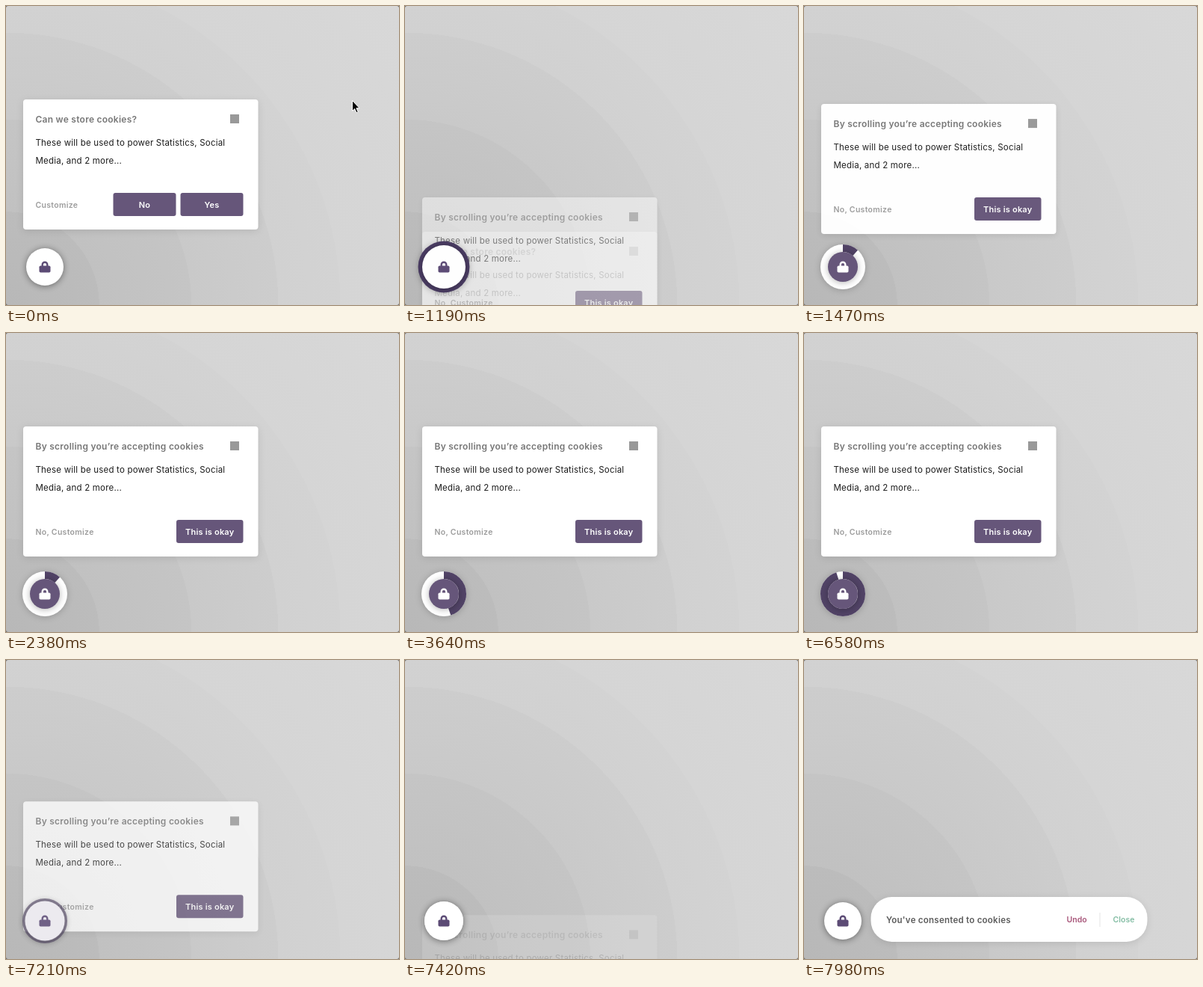
Animation, 526 px wide and 400 px high, one loop 8 s. Source, as an HTML page:

```html
<!DOCTYPE html>
<html lang="en">
<head>
<meta charset="utf-8">
<title>Cookie consent</title>
<style>
html, body { margin: 0; width: 100%; height: 100%; overflow: hidden; background: #666; }
svg { display: block; width: 526px; height: 400px; border-radius: 3px; font-family: Inter, "Open Sans", sans-serif; }
.card { filter: drop-shadow(0 2px 5px rgba(0,0,0,.1)); }
.panel { fill: #fff; }
.title { font-size: 12px; font-weight: 600; letter-spacing: .25px; fill: #777; }
.body { font-size: 11.5px; letter-spacing: .2px; fill: #1c1c1c; }
.link { font-size: 10.5px; font-weight: 600; letter-spacing: .3px; fill: #9c9c9c; }
.btn { fill: #66567a; }
.label { font-size: 11px; font-weight: 600; letter-spacing: .2px; fill: #fff; text-anchor: middle; }
.small { font-size: 10.5px; font-weight: 600; }
.mark { fill: #999; }
#disc { filter: drop-shadow(0 1px 4px rgba(0,0,0,.2)); }
#core { filter: drop-shadow(0 1px 4px rgba(0,0,0,.3)); }
</style>
</head>
<body>
<svg viewBox="0 0 526 400">
  <defs>
    <radialGradient id="glow" gradientUnits="userSpaceOnUse" cx="0" cy="400" r="660">
      <stop offset="0" stop-color="#b8b8b8"/>
      <stop offset=".189" stop-color="#bcbcbc"/>
      <stop offset=".189" stop-color="#c1c1c1"/>
      <stop offset=".376" stop-color="#c5c5c5"/>
      <stop offset=".376" stop-color="#c9c9c9"/>
      <stop offset=".552" stop-color="#cdcdcd"/>
      <stop offset=".552" stop-color="#d1d1d1"/>
      <stop offset=".678" stop-color="#d3d3d3"/>
      <stop offset=".678" stop-color="#d5d5d5"/>
      <stop offset="1" stop-color="#d8d8d8"/>
    </radialGradient>
    <g id="sheet">
      <rect class="panel" x="23" y="125" width="314.5" height="174" rx="4"/>
      <rect class="mark" x="300" y="145" width="12" height="12"/>
      <text class="body" x="39.5" y="186.5">These will be used to power Statistics, Social</text>
      <text class="body" x="39.5" y="210.5">Media, and 2 more...</text>
    </g>
  </defs>

  <rect width="526" height="400" fill="url(#glow)"/>

  <g id="ask" class="card">
    <use href="#sheet"/>
    <text class="title" x="39.5" y="155.5">Can we store cookies?</text>
    <text class="link" x="39.5" y="270">Customize</text>
    <rect class="btn" x="143.5" y="250" width="84" height="31" rx="3"/>
    <rect class="btn" x="233.5" y="250" width="84" height="31" rx="3"/>
    <text class="label" x="185.5" y="270">No</text>
    <text class="label" x="275.5" y="270">Yes</text>
  </g>

  <g id="scroll" class="card">
    <use href="#sheet"/>
    <text class="title" x="39.5" y="155.5">By scrolling you’re accepting cookies</text>
    <text class="link" x="39.5" y="270">No, Customize</text>
    <rect class="btn" x="228" y="250" width="89.5" height="31" rx="3"/>
    <text class="label" x="272.7" y="270">This is okay</text>
  </g>

  <g id="toast" class="card">
    <rect class="panel" x="89.5" y="317" width="370" height="60" rx="28"/>
    <text class="title" x="110" y="351.5" style="fill:#5c5c5c;font-size:11.5px">You've consented to cookies</text>
    <text class="small" x="351.5" y="351" fill="#a8567a">Undo</text>
    <path d="M396 338v19" stroke="#e4e4e4"/>
    <text class="small" x="413.5" y="351" fill="#84bda4">Close</text>
  </g>

  <g transform="translate(52 349)">
    <circle id="disc" r="24"/>
    <circle id="arc" r="25" fill="none" stroke="#514366" stroke-width="10" pathLength="360" transform="rotate(-90)"/>
    <circle id="core" r="25"/>
    <g id="lock">
      <rect x="-7.5" y="-1.5" width="15" height="9" rx="1.8"/>
      <path d="M-4.5 -1V-3a4.5 4.5 0 0 1 9 0V-1h-2.4V-3a2.1 2.1 0 0 0-4.2 0V-1z"/>
    </g>
  </g>

  <path id="cursor" d="M463.5 126.5v14l3.2-3 2.3 5.2 2.2-1-2.3-5h4.2z" fill="#000" stroke="#fff"/>
</svg>

<script>
const LOOP = 8000;

// steps: [ms, value, easing towards the next step]
function play(id, prop, steps) {
  const all = [[0, steps[0][1]], ...steps, [LOOP, steps.at(-1)[1]]];
  const frames = all.map(([ms, value, easing = 'linear']) =>
    ({ offset: ms / LOOP, [prop]: value, easing }));
  document.getElementById(id).animate(frames, { duration: LOOP, iterations: Infinity });
}

// p: 0 = in place, 1 = gone
function slide(id, steps, axis, distance) {
  play(id, 'transform', steps.map(([ms, p, e]) => [ms, `translate${axis}(${p * distance}px)`, e]));
  play(id, 'opacity', steps.map(([ms, p, e]) => [ms, 1 - p, e]));
}

slide('ask', [[965, 0, 'ease'], [1505, 1]], 'Y', 250);
slide('scroll', [[1039, 1, 'ease'], [1579, 0], [7112, 0, 'ease'], [7652, 1]], 'Y', 250);
slide('toast', [[7490, 1, 'ease-out'], [7980, 0]], 'X', -60);
play('cursor', 'opacity', [[70, 1], [280, 0]]);

const WHITE = '#ffffff', PLUM = '#66567a', DARK = '#4a3c63', INK = '#5c4b75';

play('disc', 'r', [[880, '24px', 'ease-out'], [1190, '34.5px', 'ease-in-out'], [1470, '30px'],
  [6900, '30px', 'ease-in-out'], [7420, '26px'], [7630, '24px']]);
play('disc', 'fill', [[1190, DARK], [1400, WHITE]]);
play('core', 'r', [[880, '25px', 'ease-out'], [1190, '29px', 'ease-in-out'], [1470, '20px'],
  [6900, '20px', 'ease-in-out'], [7280, '27px'], [7420, '26px'], [7630, '25px']]);
play('core', 'fill', [[1190, WHITE], [1400, PLUM], [6930, PLUM], [7250, WHITE]]);
play('lock', 'fill', [[1190, INK], [1400, WHITE], [6930, WHITE], [7250, INK]]);
play('arc', 'opacity', [[1190, 0], [1330, 1], [7100, 1], [7380, 0]]);

const turns = [[1190, 0, 'ease-out'], [1470, 42], [2550, 42, 'ease-in-out'], [3290, 162],
  [5220, 162, 'ease-in-out'], [6020, 343], [6900, 343, 'ease-out'], [7100, 360]];
play('arc', 'strokeDasharray', turns.map(([ms, deg, e]) => [ms, `${deg} 720`, e]));
</script>
</body>
</html>
```
